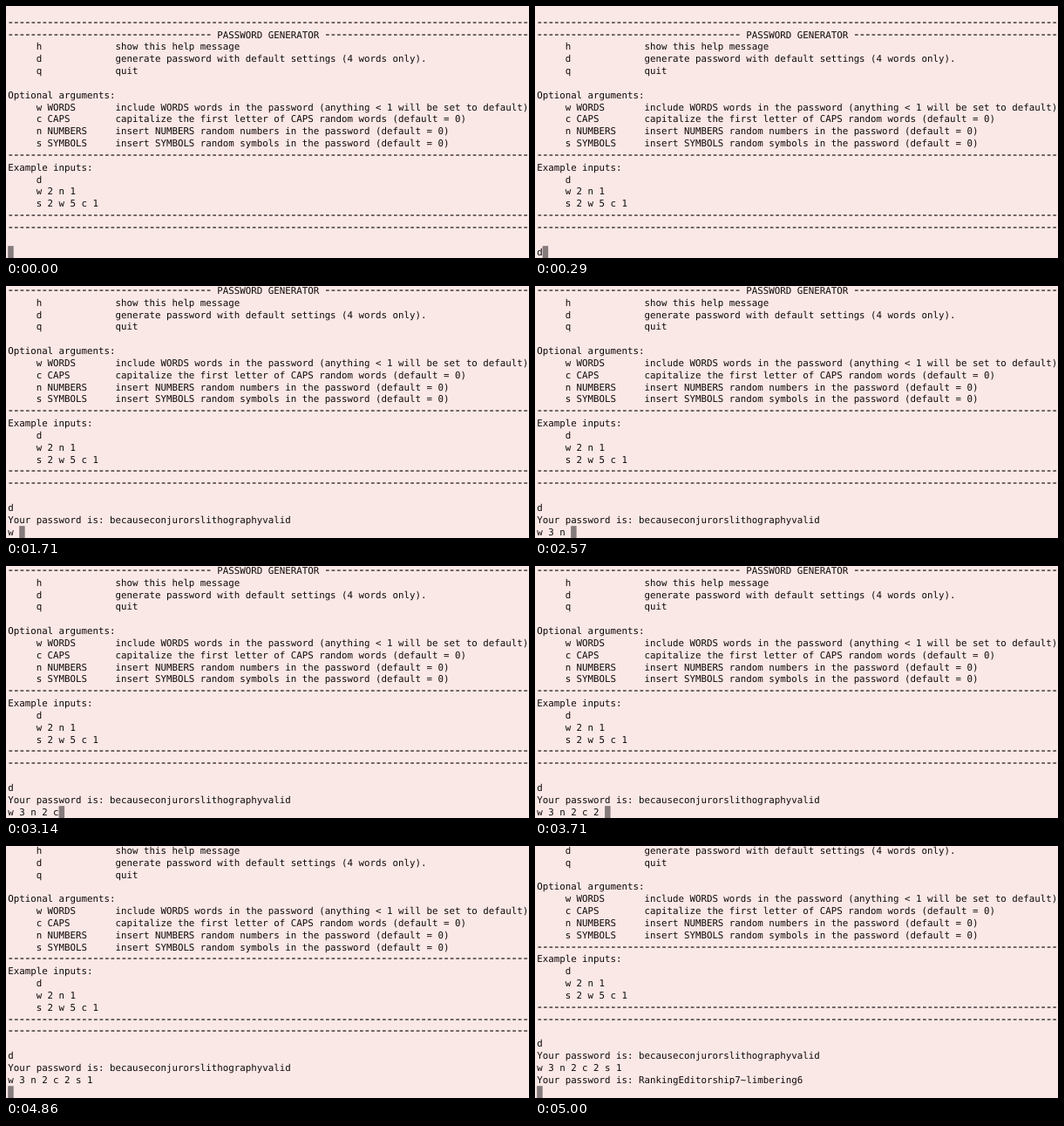
Write an HTML page with a canvas that moves like this. It is 600 px wide and 289 px high and loops after 6010 ms.

```html
<!DOCTYPE html>
<html lang="en">
<head>
<meta charset="utf-8">
<title>Password generator session</title>
<style>
  html, body { margin: 0; width: 100%; height: 100%; overflow: hidden; background: #fae8e6; }
  canvas { display: block; }
</style>
</head>
<body>
<canvas id="terminal" width="600" height="289"></canvas>
<script>
const ctx = document.getElementById('terminal').getContext('2d');

const WIDTH = 600, HEIGHT = 289;
const LOOP = 6010;
const ROWS = 21;
const CELL = { left: 2.2, width: 6.49, height: 13.83, baseline: 10.43 };
const COLORS = { paper: '#fae8e6', ink: '#0e0a0a', cursor: '#857b7c' };
const font = size => `${size}px "DejaVu Sans Mono", monospace`;
const TEXT_FONT = font(10.8);
const DASH_FONT = font(14.5);

const rule = '-'.repeat(92);
const side = '-'.repeat(36);
const entry = (key, text) => '     ' + key.padEnd(14) + text;

const HELP = [
  '',
  rule,
  `${side} PASSWORD GENERATOR ${side}`,
  entry('h', 'show this help message'),
  entry('d', 'generate password with default settings (4 words only).'),
  entry('q', 'quit'),
  '',
  'Optional arguments:',
  entry('w WORDS', 'include WORDS words in the password (anything < 1 will be set to default)'),
  entry('c CAPS', 'capitalize the first letter of CAPS random words (default = 0)'),
  entry('n NUMBERS', 'insert NUMBERS random numbers in the password (default = 0)'),
  entry('s SYMBOLS', 'insert SYMBOLS random symbols in the password (default = 0)'),
  rule,
  'Example inputs:',
  entry('d', ''),
  entry('w 2 n 1', ''),
  entry('s 2 w 5 c 1', ''),
  rule,
  rule,
  ''
];

const COMMAND = 'w 3 n 2 c 2 s 1';
const KEY_TIMES = [1570, 1710, 2000, 2140, 2290, 2570, 2710, 2860,
                   3140, 3290, 3430, 3710, 4290, 4430, 4710];
const FIRST_KEY = 290, FIRST_REPLY = 710, ENTER = 4860, SECOND_REPLY = 5000;

const reply = password => 'Your password is: ' + password;

// The last line returned is the one holding the cursor.
function transcript(t) {
  if (t < FIRST_REPLY) return [...HELP, t < FIRST_KEY ? '' : 'd'];

  const typed = KEY_TIMES.filter(time => time <= t).length;
  const lines = [...HELP, 'd', reply('becauseconjurorslithographyvalid'), COMMAND.slice(0, typed)];
  if (t >= SECOND_REPLY) lines.push(reply('RankingEditorship7~limbering6'));
  if (t >= ENTER) lines.push('');
  return lines;
}

const columnX = column => CELL.left + column * CELL.width;
const rowY = row => HEIGHT - (ROWS - row) * CELL.height;

function drawLine(text, row) {
  const baseline = Math.round(rowY(row) + CELL.baseline);
  [...text].forEach((char, column) => {
    if (char === ' ') return;
    ctx.font = char === '-' ? DASH_FONT : TEXT_FONT;
    ctx.fillText(char, columnX(column + 0.5), baseline);
  });
}

function draw(t) {
  ctx.fillStyle = COLORS.paper;
  ctx.fillRect(0, 0, WIDTH, HEIGHT);

  const lines = transcript(t).slice(-ROWS);
  ctx.fillStyle = COLORS.cursor;
  ctx.fillRect(columnX(lines[ROWS - 1].length), rowY(ROWS - 1), CELL.width, CELL.height);

  ctx.textRendering = 'geometricPrecision';
  ctx.textAlign = 'center';
  ctx.fillStyle = COLORS.ink;
  lines.forEach(drawLine);
}

const start = performance.now();
function tick() {
  draw((performance.now() - start) % LOOP);
  requestAnimationFrame(tick);
}
tick();
</script>
</body>
</html>
```
